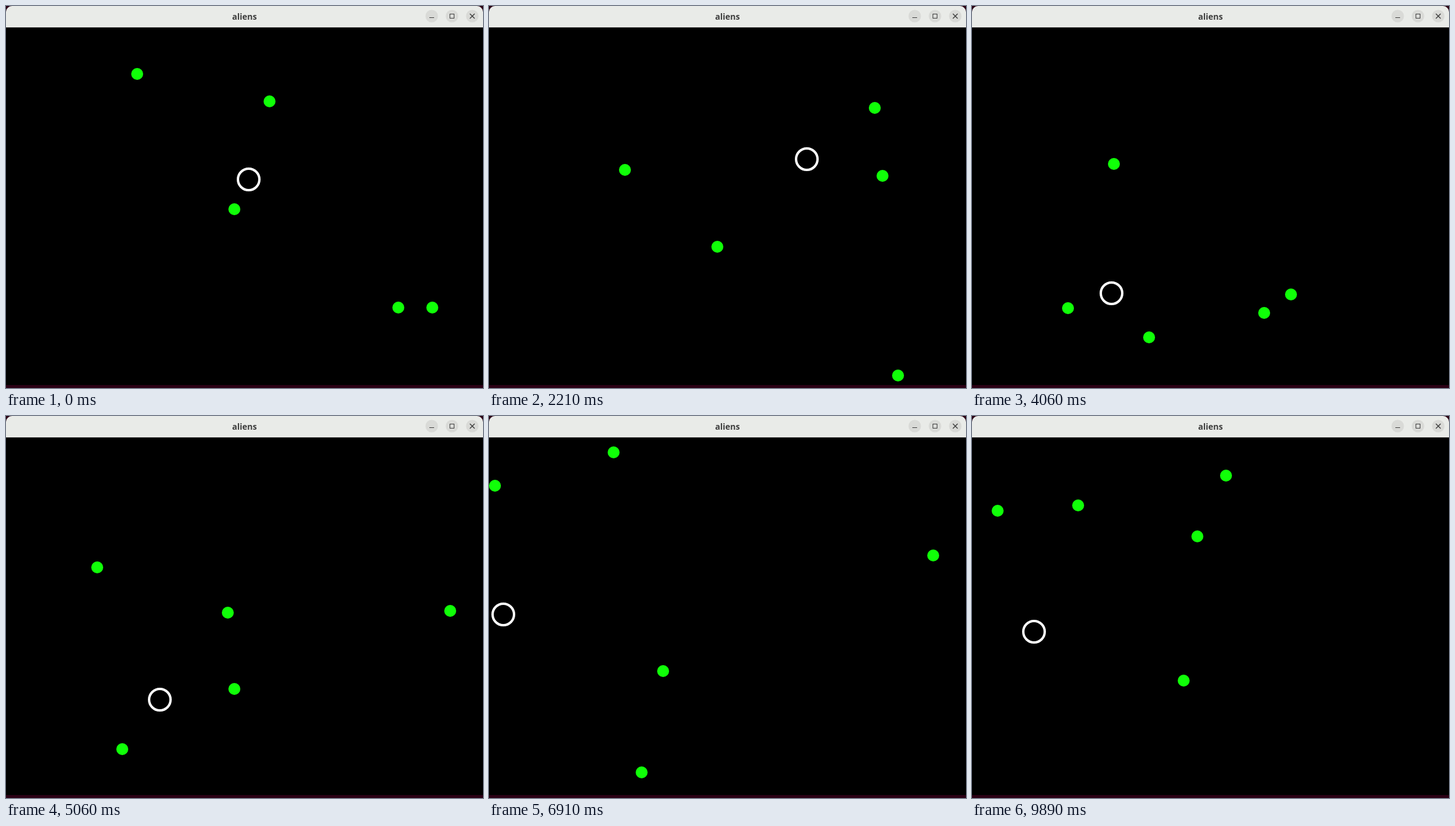
Write an HTML page with a canvas that moves like this. It is 800 by 641 pixels and loops after 9.93 s.

```html
<!DOCTYPE html>
<html lang="en">
<head>
<meta charset="utf-8">
<title>aliens</title>
<style>
  html, body { margin: 0; width: 100%; height: 100%; overflow: hidden; background: #000; }
  canvas { display: block; }
</style>
</head>
<body>
<canvas id="stage" width="800" height="641"></canvas>
<script>
const ctx = document.getElementById('stage').getContext('2d');
const LOOP = 9930, LAST_STEP = 295, STEP = 9890 / LAST_STEP;
const WIDTH = 800, HEIGHT = 641, BAR = 36, FLOOR = 636, RADIUS = 10;
const INK = '#3d3d3d';

// An alien flies straight and bounces off the walls until a hit changes its velocity.
class Alien {
  legs = [];

  placed(step, x, y, vx, vy) {
    this.legs.push({ step, x, y, vx, vy });
    return this;
  }

  hit(step, vx, vy) {
    return this.placed(step, ...this.at(step), vx, vy);
  }

  at(step) {
    const leg = this.legs.findLast(l => l.step <= step);
    const time = step - leg.step;
    return [
      bounce(leg.x + leg.vx * time, RADIUS, WIDTH - RADIUS),
      bounce(leg.y + leg.vy * time, BAR + RADIUS, FLOOR - RADIUS)
    ];
  }
}

function bounce(value, low, high) {
  const span = high - low, period = 2 * span;
  const u = ((value - low) % period + period) % period;
  return low + Math.min(u, period - u);
}

const aliens = [
  new Alien().placed(0, 658, 506, 3.57, 1.91).placed(182, 271, 347, -2.6, -11.93),
  new Alien().placed(0, 383, 341, 0, 0.95).placed(92, 129, 457, 1.115, 1.73),
  new Alien().placed(0, 442, 160, -0.1, 2.73).hit(48, 12.39, -0.36),
  new Alien().placed(0, 220, 114, 0.12, 2.44).hit(66, 5.58, 3.8)
    .hit(121, -5.42, -5.12).hit(180, 2.96, 9.46).hit(206, -16.02, 9.35),
  new Alien().placed(0, 715, 506, 3.3, -5.08).hit(66, -16.8, 9.55).hit(121, 14.95, -7.63)
    .hit(180, -15.04, -5.04).hit(206, 15.6, 10.64).hit(251, 15.68, 11.5)
];

// The player glides between a few stops and rests at the last one.
const stops = [[0, 407, 291], [66, 533, 257], [121, 234, 482],
  [180, 280, 471], [206, 24, 333], [251, 104, 362]];

function playerAt(step) {
  const next = stops.findIndex(stop => stop[0] > step);
  if (next < 0) return stops.at(-1).slice(1);
  const [t0, x0, y0] = stops[next - 1], [t1, x1, y1] = stops[next];
  const p = (step - t0) / (t1 - t0), eased = p * p * (3 - 2 * p);
  return [x0 + (x1 - x0) * eased, y0 + (y1 - y0) * eased];
}

function circle(x, y, r) {
  ctx.beginPath();
  ctx.arc(Math.round(x), Math.round(y), r, 0, 2 * Math.PI);
}

function disc(x, y, r, color) {
  circle(x, y, r);
  ctx.fillStyle = color;
  ctx.fill();
}

function line(x0, y0, x1, y1) {
  ctx.beginPath();
  ctx.moveTo(x0, y0);
  ctx.lineTo(x1, y1);
  ctx.stroke();
}

function drawWindow() {
  ctx.fillStyle = '#2a0014';
  ctx.fillRect(0, 0, WIDTH, HEIGHT);
  ctx.fillStyle = '#000';
  ctx.fillRect(0, BAR, WIDTH, FLOOR - BAR);

  ctx.fillStyle = '#e9ebe8';
  ctx.beginPath();
  ctx.roundRect(0, 0, WIDTH, BAR, [10, 10, 0, 0]);
  ctx.fill();
  ctx.fillStyle = '#d6d6d3';
  ctx.fillRect(0, BAR - 1, WIDTH, 1);

  ctx.fillStyle = INK;
  ctx.font = 'bold 14px "Noto Sans", sans-serif';
  ctx.textAlign = 'center';
  ctx.fillText('aliens', WIDTH / 2, 23);

  for (const x of [714, 748, 782]) disc(x, 17, 10.5, '#d9dad7');
  ctx.strokeStyle = INK;
  ctx.lineWidth = 1;
  ctx.strokeRect(744.5, 13.5, 7, 7);
  line(710, 19.5, 718, 19.5);
  ctx.lineWidth = 1.4;
  line(778, 13, 786, 21);
  line(786, 13, 778, 21);
}

function draw() {
  const step = Math.min(LAST_STEP, Math.round(performance.now() % LOOP / STEP));
  drawWindow();
  for (const alien of aliens) disc(...alien.at(step), RADIUS, '#10ff08');
  circle(...playerAt(step), 18);
  ctx.strokeStyle = '#fff';
  ctx.lineWidth = 4;
  ctx.stroke();
  requestAnimationFrame(draw);
}
draw();
</script>
</body>
</html>
```
